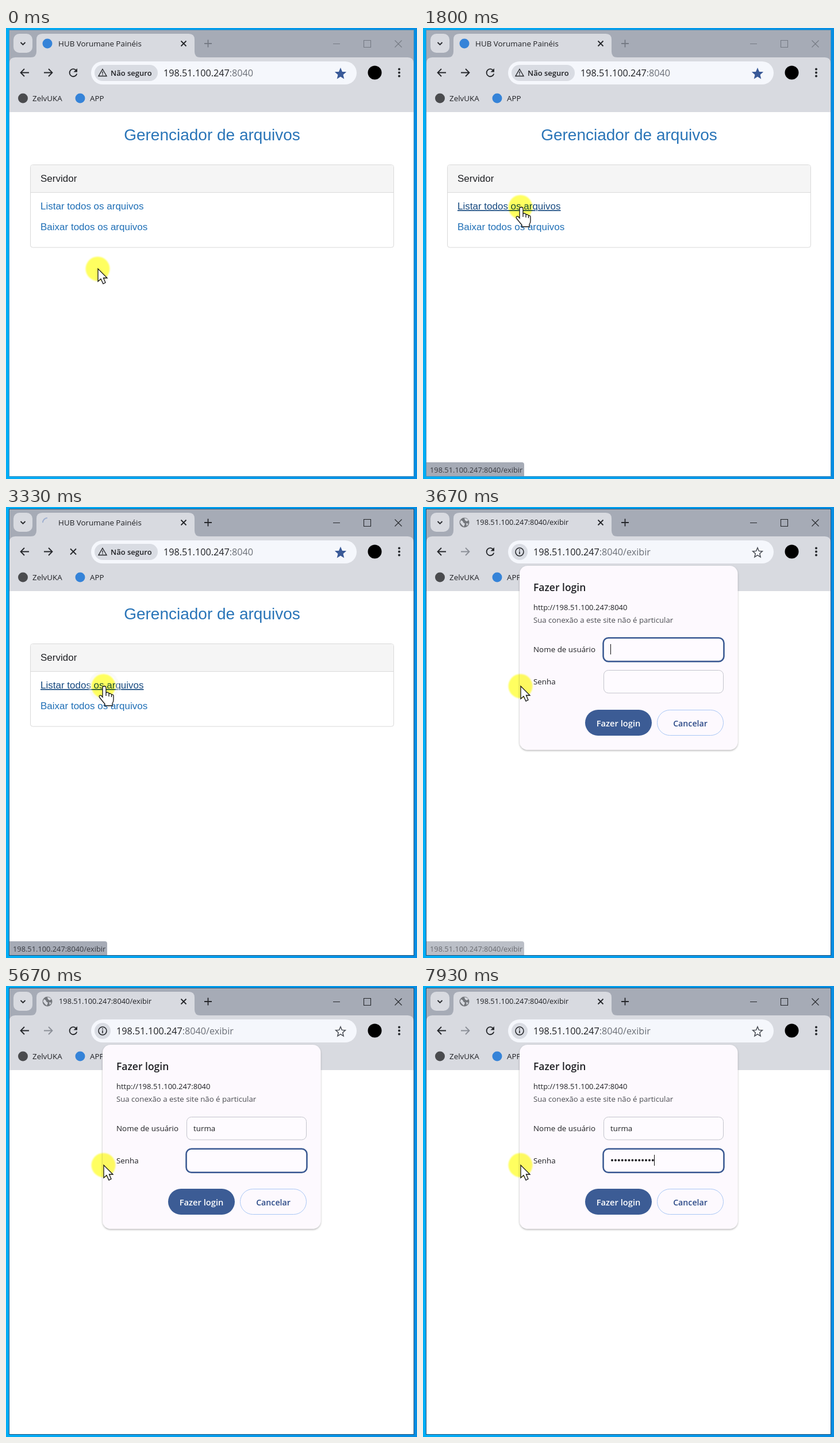
An HTML page that plays this animation: 715x783 px, repeating every 8000 ms.

```html
<!DOCTYPE html>
<html lang="pt-BR">
<head>
<meta charset="utf-8">
<title>Gerenciador de arquivos</title>
<style>
  html, body { margin: 0; width: 100%; height: 100%; overflow: hidden; }
  svg { display: block; }
  text { font: 13.4px "Open Sans", "Noto Sans", sans-serif; fill: #1f2024; white-space: pre; }
  .page text { font: 17px "Liberation Sans", Arial, sans-serif; }
  .page .heading { font-size: 28px; text-anchor: middle; fill: #2a75b8; }
  .page .link { fill: #1f6fb6; }
  .page .hover { fill: #174a80; text-decoration: underline; }
  text.address { font-size: 16.2px; }
  text.small { font-size: 12.8px; }
  text.strong { font-weight: 600; }
  .dim { fill: #6b6f77; }
  .icon { fill: none; stroke: #25272b; stroke-width: 1.8; }
  .field { fill: #fefbff; stroke: #c3c4cc; }
  .focus { fill: none; stroke: #3a5993; stroke-width: 2.5; }
  #highlight { fill: #ffff60; mix-blend-mode: multiply; }
</style>
</head>
<body>
<svg width="715" height="783" viewBox="0 0 715 783">
  <defs>
    <linearGradient id="desktop">
      <stop offset="0" stop-color="#00adf5"/><stop offset="1" stop-color="#058de2"/>
    </linearGradient>
    <filter id="shadow" x="-10%" y="-10%" width="120%" height="120%">
      <feDropShadow dx="0" dy="1.500" stdDeviation="1.800" flood-opacity=".32"/>
    </filter>
    <filter id="soft"><feGaussianBlur stdDeviation=".8"/></filter>
  </defs>

  <rect width="715" height="783" fill="url(#desktop)"/>
  <rect x="6" y="4" width="703" height="774" fill="#fff"/>

  <!-- Tab strip and toolbar -->
  <path d="M6 4H709V70H6Z" fill="#a6abb6"/>
  <path d="M6 146V61Q6 51 16 51H43Q53 51 53 41V20Q53 10 63 10H318Q328 10 328 20V41Q328 51 338 51H699Q709 51 709 61V146Z" fill="#d8dae0"/>
  <rect x="13" y="10" width="33" height="33" rx="10" fill="#d8dae0"/>
  <path class="icon" d="M25.500 25L29.500 29L33.500 25"/>
  <path class="icon" d="M304.500 22.500L313.500 31.500M313.500 22.500L304.500 31.500"/>
  <path id="newTab" class="icon" d="M345 27H358M351.500 20.500V33.500"/>
  <path id="controls" class="icon" style="stroke-width:1.100" d="M569 27.500H581M622.500 21.500H634.500V33.500H622.500ZM676.500 21.500L688.500 33.500M688.500 21.500L676.500 33.500"/>
  <path class="icon" d="M40 77.500H26M32 71L25.500 77.500L32 84"/>
  <path id="forward" class="icon" d="M66 77.500H80M74 71L80.500 77.500L74 84"/>
  <g id="reload">
    <path class="icon" d="M122 73.500A6.500 6.500 0 1 0 123.300 79.500"/>
    <path d="M124 70V76.500H117.500Z" fill="#25272b"/>
  </g>
  <path id="stop" class="icon" d="M112 72.500L122 82.500M122 72.500L112 82.500"/>
  <rect x="148" y="58" width="462" height="40" rx="20" fill="#f5f7fc"/>
  <path id="star" transform="translate(582 79) scale(.87)" d="M0 -9.500L2.700 -3L9.600 -2.400L4.300 2.200L5.900 9L0 5.400L-5.900 9L-4.300 2.200L-9.600 -2.400L-2.700 -3Z" stroke-width="1.700"/>
  <circle cx="641.500" cy="77.500" r="12"/>
  <path d="M684 71.500V71.510M684 77.500V77.510M684 83.500V83.510" class="icon" stroke-linecap="round" style="stroke-width:4"/>
  <circle cx="29.500" cy="122" r="8.500" fill="#4a4b4e"/>
  <text x="46" y="127">ZelvUKA</text>
  <circle cx="129" cy="122" r="8.500" fill="#3583d8"/>
  <text x="146" y="127">APP</text>

  <!-- File manager -->
  <g id="manager">
    <circle id="favicon" cx="72" cy="27" r="8.500" fill="#3583d8"/>
    <path id="spinner" d="M64 27A8 8 0 0 1 72 19" fill="none" stroke="#9eafd0" stroke-width="2"/>
    <text x="91" y="31.500">HUB Vorumane Painéis</text>
    <rect x="154" y="64" width="110" height="28" rx="14" fill="#d9dce3"/>
    <path class="icon" style="stroke-width:1.400" d="M168 71.500L175 83.500H161ZM168 75.500V79.500M168 80.500V82"/>
    <text class="strong" x="182" y="82.500" style="font-size:13px">Não seguro</text>
    <text class="address" x="274" y="84">198.51.100.247<tspan class="dim">:8040</tspan></text>
    <g class="page">
      <text class="heading" x="358.500" y="195">Gerenciador de arquivos</text>
      <rect x="42.500" y="237.500" width="632" height="143.500" rx="4" fill="#fff" stroke="#d9d9d9"/>
      <path d="M43 285V241Q43 238 46 238H671Q674 238 674 241V285Z" fill="#f5f5f5"/>
      <path d="M43 285.500H674" stroke="#d9d9d9"/>
      <text x="60" y="267">Servidor</text>
      <text id="list" class="link" x="60" y="315">Listar todos os arquivos</text>
      <text id="download" class="link" x="60" y="351">Baixar todos os arquivos</text>
    </g>
  </g>

  <!-- Login -->
  <g id="login">
    <circle cx="72" cy="27" r="8.500" fill="#74777c"/>
    <path d="M66 23Q70 24 70 27L73 29L71 34Q67 31 64.500 27ZM72 19.500L73 23L76 25L79 23Q76 19 72 19.500ZM75 28L79 29L76 33Z" fill="#d8dae0"/>
    <text class="small" x="92" y="31">198.51.100.247:8040/exibir</text>
    <circle cx="168" cy="78" r="14" fill="#d9dce3"/>
    <path class="icon" style="stroke-width:1.600" d="M175 78A7 7 0 1 0 161 78A7 7 0 1 0 175 78M168 77V82M168 73.500V75.500"/>
    <text class="address" x="192" y="84">198.51.100.247<tspan class="dim">:8040/exibir</tspan></text>
    <rect x="168" y="102" width="379.500" height="319.500" rx="14" fill="#fdf9fe" filter="url(#shadow)"/>
    <text class="strong" x="192" y="146" style="font-size:17.500px">Fazer login</text>
    <text x="192" y="179" style="font-size:13px">http://198.51.100.247:8040</text>
    <text x="192" y="201" style="font-size:13.200px;fill:#4b4c52">Sua conexão a este site não é particular</text>
    <text x="192" y="252">Nome de usuário</text>
    <text x="192" y="308">Senha</text>
    <rect class="field" x="314.500" y="227.500" width="208" height="39.500" rx="8"/>
    <rect class="field" x="314.500" y="283.500" width="208" height="39.500" rx="8"/>
    <rect id="focus" class="focus" x="313.500" width="210" height="41" rx="9"/>
    <text id="user" x="326" y="252"></text>
    <path id="dots" fill="none" stroke="#1f2024" stroke-width="4" stroke-linecap="round" stroke-dasharray="0 5.900"/>
    <path id="caret" stroke="#111"/>
    <rect x="282" y="352" width="116" height="45" rx="22.500" fill="#3c5c95"/>
    <rect x="407.500" y="352.500" width="115" height="44" rx="22" fill="#fdf9fe" stroke="#a9c7f5"/>
    <g text-anchor="middle">
      <text class="strong" x="340" y="381" style="font-size:14.700px;fill:#fff">Fazer login</text>
      <text class="strong" x="465" y="381" style="font-size:14.200px;fill:#2c4a88">Cancelar</text>
    </g>
  </g>

  <g id="status">
    <path d="M6 754H172Q176 754 176 758V779H6Z" fill="#a6abb6"/>
    <text class="small" x="12" y="771.500" style="fill:#383b42">198.51.100.247:8040/exibir</text>
  </g>
  <rect id="border" x="5.500" y="3.500" width="704" height="775" fill="none"/>

  <circle id="ripple" fill="none" stroke="#f1f1f1" stroke-width="4" filter="url(#soft)"/>
  <circle id="highlight" r="21" filter="url(#soft)"/>
  <g id="pointer" fill="#fff" stroke="#111" stroke-width="1.300">
    <path id="arrow" d="M0 0V22L5 17.500L9 26L13 24L9.500 16H16Z"/>
    <path id="hand" d="M-2 3Q-2 0 1 0T4 3V11Q9 10 9 13Q13 12 13.500 15Q17 14 17 17V24Q17 27 15 30V34H2V31L-7 20Q-9 17 -6.500 16Q-4.500 15.500 -2 19ZM4 11V17M9 13V18M13.500 15V19"/>
  </g>
</svg>
<script>
  const LOOP = 8000, STEP = 1000 / 15;
  const MOVE = 1067, ARRIVE = 1800, CLICK = 2870, LOAD = 3000, OPEN = 3400, TAB = 5130;
  const USER = "turma", DOT_PITCH = 5.9;
  const userKeys = [4530, 4600, 4730, 4870, 5000];
  const passKeys = [5930, 6200, 6330, 6470, 6530, 6730, 7000, 7130, 7270, 7400, 7600, 7800, 7930];
  const caretResets = [OPEN, ...userKeys, TAB, ...passKeys];

  const el = id => document.getElementById(id);
  const set = (id, attrs) => {
    for (const name in attrs) el(id).setAttribute(name, attrs[name]);
  };
  const show = (id, on) => { el(id).style.display = on ? "" : "none"; };
  const ramp = (t, from, to) => Math.min(1, Math.max(0, (t - from) / (to - from)));
  const countUntil = (times, t) => times.filter(time => time <= t + 4).length;

  function drawPointer(t, loggingIn) {
    const move = ramp(t, MOVE, ARRIVE);
    const x = 160 + 10 * move;
    const y = 311 + 107 * (1 - move) ** 2.14;
    const overList = !loggingIn && y < 321;
    const overDownload = y > 333 && y < 357;
    el("list").classList.toggle("hover", overList);
    el("download").classList.toggle("hover", overDownload);
    show("hand", overList || overDownload);
    show("arrow", !overList && !overDownload);
    set("pointer", { transform: `translate(${x} ${y})` });
    set("highlight", { cx: x - .5, cy: y });

    const spread = ramp(t, CLICK, OPEN);
    show("ripple", spread > 0 && spread < 1);
    set("ripple", { cx: x, cy: y, r: 14 + 12 * spread, opacity: 1 - .6 * spread });
  }

  function drawBrowser(t, loggingIn) {
    const active = t + 4 >= CLICK;
    const loading = t + 4 >= LOAD && !loggingIn;
    const starColor = loggingIn ? "#474b52" : "#3a5a98";
    el("newTab").style.stroke = el("controls").style.stroke = active ? "#25272b" : "#757a84";
    set("border", { stroke: active ? "#1b527d" : "#4a91bd" });
    show("favicon", !loading);
    show("spinner", loading);
    set("spinner", { transform: `rotate(${(3330 - t) * .3} 72 27)` });
    show("reload", !loading);
    show("stop", loading);
    el("forward").style.stroke = loggingIn ? "#8b8f97" : "";
    set("star", { fill: loggingIn ? "none" : starColor, stroke: starColor });
    show("manager", !loggingIn);
    show("login", loggingIn);
    set("status", { opacity: ramp(t, 1560, 1730) - ramp(t, 3600, 3870) });
  }

  function drawForm(t) {
    const onPassword = t + 4 >= TAB;
    const dots = countUntil(passKeys, t);
    el("user").textContent = USER.slice(0, countUntil(userKeys, t));
    set("focus", { y: onPassword ? 282.7 : 227.2 });
    show("dots", dots);
    set("dots", { d: `M329 302.500h${DOT_PITCH * (dots - 1) + .1}` });

    const width = onPassword ? DOT_PITCH * dots : el("user").getComputedTextLength();
    const x = Math.floor(326 + width) + .5;
    const lastReset = caretResets[countUntil(caretResets, t) - 1];
    show("caret", (t + 4 - lastReset) % 1067 < 530);
    set("caret", { d: onPassword ? `M${x} 293V312` : `M${x} 238V256` });
  }

  function draw(now) {
    const t = Math.floor((now % LOOP + 4) / STEP) * STEP;
    const loggingIn = t + 4 >= OPEN;
    drawBrowser(t, loggingIn);
    drawPointer(t, loggingIn);
    if (loggingIn) drawForm(t);
  }

  const start = performance.now();
  function tick() {
    draw(performance.now() - start);
    requestAnimationFrame(tick);
  }
  tick();
</script>
</body>
</html>
```
